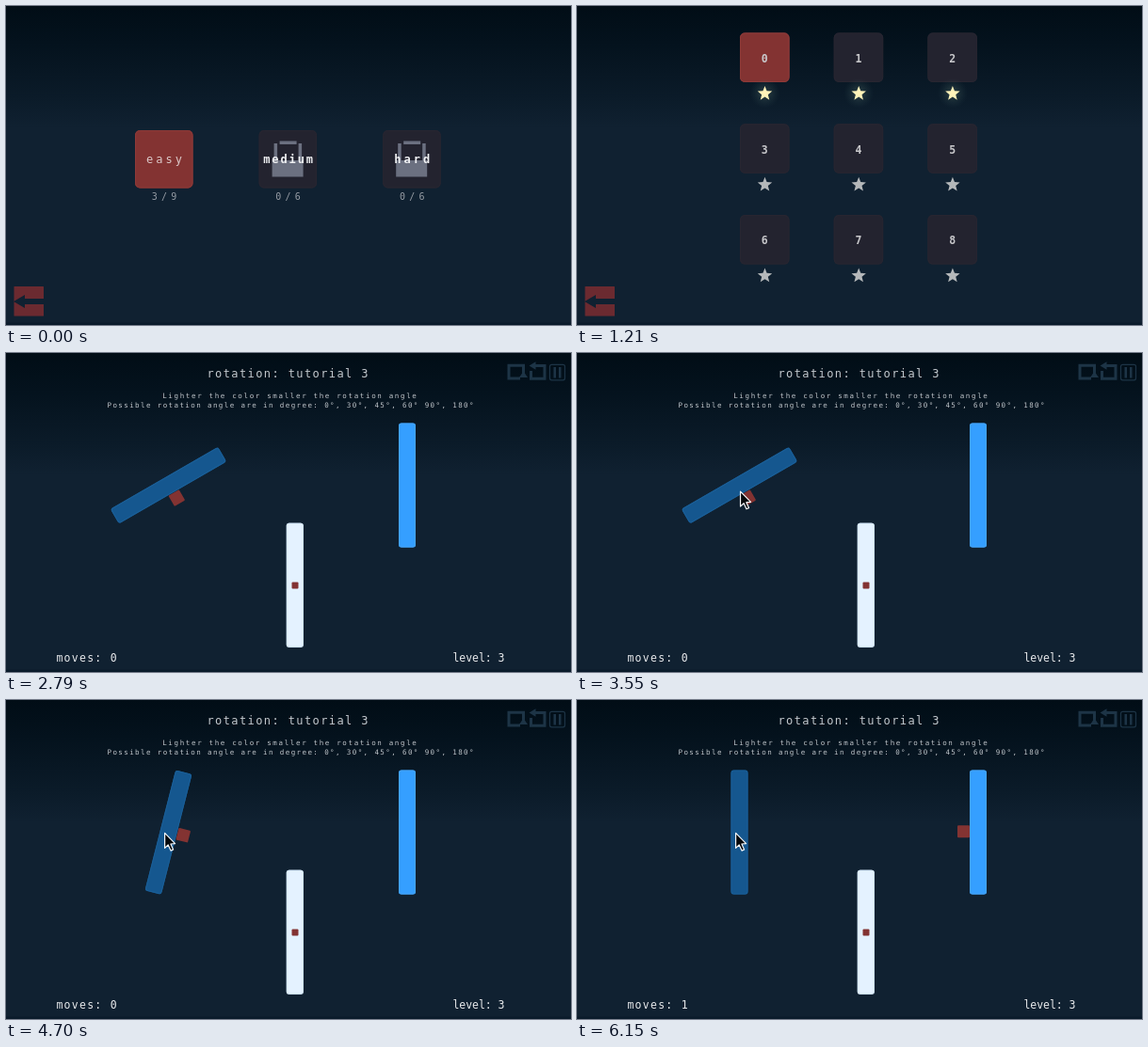
Animation, 600 px wide and 339 px high, one loop 6.18 s. Source, as an HTML page with a canvas:

```html
<!DOCTYPE html>
<html lang="en">
<head>
<meta charset="utf-8">
<title>Rotation puzzle</title>
<style>
html, body { margin: 0; width: 100%; height: 100%; overflow: hidden; background: #102131; }
canvas { display: block; width: 600px; height: 339px; }
</style>
</head>
<body>
<canvas id="stage"></canvas>
<script>
const canvas = document.getElementById('stage');
const g = canvas.getContext('2d');
const W = 600, H = 339, LOOP = 6180;
const scale = window.devicePixelRatio || 1;
canvas.width = W * scale;
canvas.height = H * scale;

const RED = '#833332', CARD = '#23232f', LOCK = '#6b7080', ICON = '#1d3446';
const FONT = '"DejaVu Sans Mono", monospace';

// Scene times in ms
const GRID_AT = 1050, PICK_AT = 1530, LEVEL_AT = 2670;
const CURSOR_AT = 3330, CURSOR_STOP = 3750;
const TURN_AT = 3940, TURN_END = 4940, LAND_AT = 5975;

const clamp = v => Math.max(0, Math.min(1, v));
const span = (t, a, b) => clamp((t - a) / (b - a));
const mix = (a, b, k) => a + (b - a) * k;
const ease = k => 1 - (1 - k) ** 3;

function text(str, x, y, size, gap, color, weight = 'normal') {
  g.font = `${weight} ${size}px ${FONT}`;
  g.letterSpacing = gap + 'px';
  g.textAlign = 'center';
  g.textBaseline = 'alphabetic';
  g.fillStyle = color;
  g.fillText(str, x + gap / 2, y);
}

function box(x, y, w, h, r, fill, edge) {
  g.beginPath();
  g.roundRect(x, y, w, h, r);
  g.fillStyle = fill;
  g.fill();
  if (!edge) return;
  g.beginPath();
  g.roundRect(x + 0.5, y + 0.5, w - 1, h - 1, r);
  g.strokeStyle = edge;
  g.lineWidth = 1;
  g.stroke();
}

function poly(points, fill) {
  g.beginPath();
  for (const [x, y] of points) g.lineTo(x, y);
  g.closePath();
  g.fillStyle = fill;
  g.fill();
}

function background() {
  const sky = g.createLinearGradient(0, 0, 0, 130);
  sky.addColorStop(0, '#010d16');
  sky.addColorStop(0.3, '#04121d');
  sky.addColorStop(0.75, '#0b1b29');
  sky.addColorStop(1, '#102131');
  g.fillStyle = sky;
  g.fillRect(0, 0, W, H);
  g.fillStyle = '#0a1b2b';
  g.fillRect(0, 336.5, W, 2.5);
}

function card(x, y, size, heat) {
  box(x, y, size, size, 5, CARD, '#282631');
  if (!heat) return;
  g.globalAlpha = heat;
  box(x, y, size, size, 5, RED, '#8e3a38');
  g.globalAlpha = 1;
}

function backButton() {
  box(8.5, 298, 31.5, 31.5, 0.5, '#6b2a30');
  poly([[8, 314], [20, 307], [20, 311], [40, 311], [40, 317], [20, 317], [20, 321]], '#102131');
}

function padlock(x) {
  g.fillStyle = LOCK;
  g.fillRect(x + 14, 164, 33, 17.5);
  g.fillRect(x + 16, 146, 3.5, 18);
  g.fillRect(x + 42, 146, 3.5, 18);
  g.fillRect(x + 22, 143.5, 18, 3.5);
}

function menu() {
  const tiers = [['easy', '3/9', 3], ['medium', '0/6', 1.9], ['hard', '0/6', 3]];
  tiers.forEach(([name, score, gap], i) => {
    const x = 137 + i * 131.6;
    card(x, 132, 61.5, i ? 0 : 1);
    if (i) padlock(x);
    text(name, x + 31, 167.2, 12, gap, i ? '#f0f1f3' : '#dcc9c9', i ? 'bold' : 'normal');
    text(score, x + 31, 205.6, 10, 4.2, '#969ca4');
  });
  backButton();
}

function star(x, y, lit) {
  if (lit) {
    const glow = g.createRadialGradient(x, y, 2, x, y, 16);
    glow.addColorStop(0, 'rgba(120,150,130,.28)');
    glow.addColorStop(1, 'rgba(60,95,100,0)');
    g.fillStyle = glow;
    g.fillRect(x - 16, y - 16, 32, 32);
  }
  const points = [];
  for (let i = 0; i < 10; i++) {
    const r = i % 2 ? 3.5 : 8.1, a = i * Math.PI / 5 - Math.PI / 2;
    points.push([x + r * Math.cos(a), y + 0.6 + r * Math.sin(a)]);
  }
  poly(points, lit ? '#fff3b9' : '#b5b8ba');
}

function grid(t) {
  const moved = span(t, PICK_AT, PICK_AT + 100);
  for (let i = 0; i < 9; i++) {
    const x = 173 + (i % 3) * 99.7, y = 28.5 + Math.floor(i / 3) * 96.8;
    const heat = i === 0 ? 1 - moved : i === 3 ? moved : 0;
    card(x, y, 52.5, heat);
    text(String(i), x + 26.3, y + 31.2, 11.5, 0, '#c8c8cb', 'bold');
    star(x + 26.5, y + 64, i < 3);
  }
  backButton();
}

function line(points, width) {
  g.beginPath();
  for (const [x, y] of points) g.lineTo(x, y);
  g.strokeStyle = ICON;
  g.lineWidth = width;
  g.stroke();
}

function toolbar() {
  line([[546, 27], [534, 27], [534, 13.3], [549.5, 13.3], [549.5, 22]], 3);
  poly([[545, 26], [549.5, 19.5], [554, 26]], ICON);
  line([[557.5, 19], [557.5, 27.3], [572, 27.3], [572, 13.5], [562, 13.5]], 3);
  poly([[555.5, 13.5], [562.5, 9.3], [562.5, 17.7]], ICON);
  g.beginPath();
  g.roundRect(577.5, 12.3, 16, 16.5, 2);
  g.lineWidth = 1.2;
  g.stroke();
  g.fillStyle = ICON;
  g.fillRect(581.5, 15, 2.5, 11.5);
  g.fillRect(587, 15, 2.5, 11.5);
}

function bar(x, y, turn, fill, edge) {
  g.save();
  g.translate(x, y);
  g.rotate(turn);
  box(-9, -66, 18, 132, 2.5, fill, edge);
  g.restore();
}

function block(x, y, turn, size) {
  g.save();
  g.translate(x, y);
  g.rotate(turn);
  box(-size / 2, -size / 2, size, size, 1, RED);
  g.restore();
}

function pointer(x, y) {
  g.beginPath();
  g.moveTo(x, y);
  g.lineTo(x, y + 16);
  g.lineTo(x + 3.6, y + 12.6);
  g.lineTo(x + 6.4, y + 18.7);
  g.lineTo(x + 9, y + 17.5);
  g.lineTo(x + 6.3, y + 11.6);
  g.lineTo(x + 11, y + 11.2);
  g.closePath();
  g.fillStyle = '#05080b';
  g.fill();
  g.strokeStyle = '#f4f6f8';
  g.lineWidth = 1.2;
  g.lineJoin = 'round';
  g.stroke();
  g.lineJoin = 'miter';
}

function level(t) {
  text('rotation: tutorial 3', 299, 25.6, 12, 1.4, '#c4c9ce');
  text('Lighter the color smaller the rotation angle', 301, 48.2, 7.5, 1.65, '#c0c5ca');
  text('Possible rotation angle are in degree: 0°, 30°, 45°, 60° 90°, 180°', 302, 57.5, 7.5, 1.4, '#c0c5ca');
  toolbar();

  // Clockwise tilt from vertical; the block rides on the bar's right side
  const lean = Math.PI / 3 * (1 - span(t, TURN_AT, TURN_END));
  const flight = 222 * span(t, TURN_END, LAND_AT);
  const cx = 172.5, cy = 140.6, dx = 16, dy = -0.9;
  const cos = Math.cos(lean), sin = Math.sin(lean);

  bar(cx, cy, lean, '#15578f', '#1a5f98');
  bar(426, cy, 0, '#359fff', '#46a4f6');
  bar(306.8, 246.7, 0, '#e4f2ff', '#d3e7f9');
  block(307, 247, 0, 7);
  block(cx + dx * cos - dy * sin + flight, cy + dx * sin + dy * cos, lean, 13);

  text('moves: ' + (t >= TURN_END ? 1 : 0), 85.5, 327.7, 11.5, 1.25, '#e8eaec');
  text('level: 3', 502, 327.7, 11.5, -0.05, '#e8eaec');

  if (t >= CURSOR_AT) {
    const k = ease(span(t, CURSOR_AT, CURSOR_STOP));
    pointer(mix(215, 168.6, k), mix(195, 141.4, k));
  }
}

function draw(t) {
  g.setTransform(scale, 0, 0, scale, 0, 0);
  background();
  if (t < GRID_AT) menu();
  else if (t < LEVEL_AT) grid(t);
  else level(t);
}

const start = performance.now();
function tick() {
  draw((performance.now() - start) % LOOP);
  requestAnimationFrame(tick);
}
tick();
</script>
</body>
</html>
```
